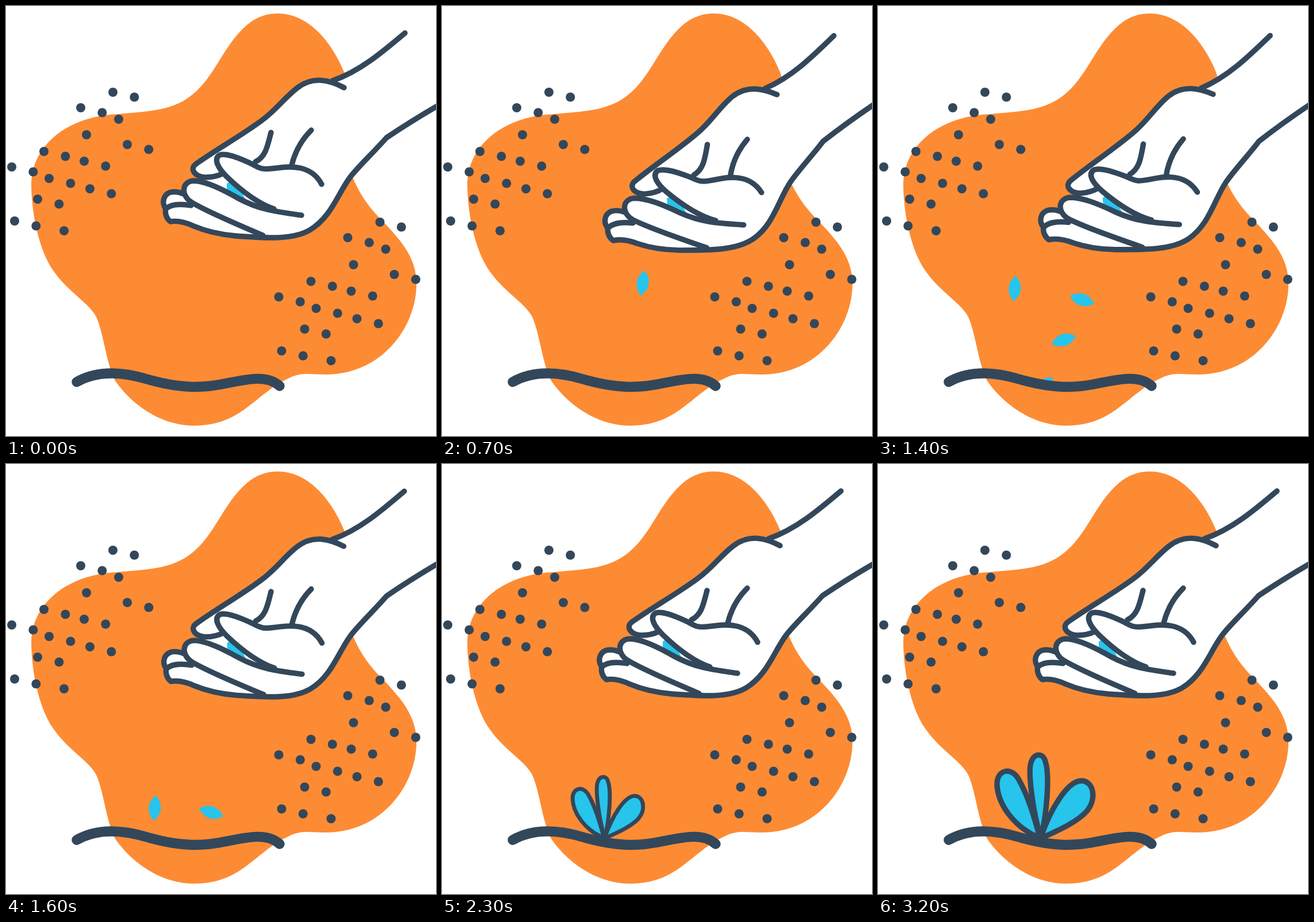
Animation, 748 px wide and 748 px high, one loop 3400 ms. Source, as an HTML page:

```html
<!DOCTYPE html>
<html lang="en">
<head>
<meta charset="utf-8">
<title>Planting hand</title>
<style>
  html, body { margin: 0; width: 100%; height: 100%; overflow: hidden; background: #fff; }
  svg { display: block; width: 100vw; height: 100vh; }
  .line { fill: none; stroke: #33475b; stroke-width: 9.4; stroke-linecap: round; stroke-linejoin: round; }
  .ground { stroke-width: 17.4; }
  .leaf { fill: #27c4ec; }
</style>
</head>
<body>
<svg viewBox="0 0 748 748">
  <defs>
    <clipPath id="air">
      <path d="M0 0H748V661H476C455 642 425 648 385 656C340 666 300 665 245 649C205 637 160 633 123 654H0Z"/>
    </clipPath>
    <path id="petal" d="M0 -22C14 -9 14 9 0 22C-14 9 -14 -9 0 -22Z"/>
    <g id="dots" fill="#33475b"></g>
  </defs>

  <path fill="#fd8b34" d="M473 13C525 13 566 61 588 115C606 165 588 250 603 298C617 331 633 352 656 375C684 405 714 436 714 483C714 560 652 642 555 641C530 641 515 637 495 646C460 662 445 680 413 703C388 721 360 730 328 730C270 730 219 694 190 652C174 620 171 575 158 543C147 518 108 498 82 460C57 424 44 360 44 308C46 240 110 191 195 188C238 184 280 183 312 163C362 132 374 72 419 33C437 18 455 13 473 13Z"/>
  <use href="#dots"/>
  <use href="#dots" x="464.5" y="226"/>

  <g id="hand">
    <path fill="#fff" d="M694 47C655 80 620 110 568 130C545 126 527 126 506 143C483 161 470 181 445 199C410 225 370 247 333 273C316 283 330 298 347 298L328 304C312 304 305 316 309 327C302 324 294 322 286 324C274 328 270 342 278 353C276 360 279 370 286 375C298 373 312 376 327 383C346 391 366 397 400 400C455 404 498 407 528 390C566 368 578 324 600 296C616 276 638 256 662 229C705 200 735 182 780 157Z"/>
    <path class="leaf" d="M384 309Q387 305 393 307Q409 319 416 335Q398 331 384 318Z"/>
    <g class="line">
      <path d="M694 47C655 80 615 114 568 130"/>
      <path d="M588 142C565 130 535 120 506 143C483 161 470 181 445 199C410 225 370 247 333 273C316 283 330 298 347 298C360 298 370 295 378 291"/>
      <path d="M780 157C735 182 705 200 662 229C638 256 616 276 600 296C578 324 566 368 528 390C498 407 455 404 400 400C366 397 346 391 327 383C312 376 298 373 286 375C279 370 276 360 278 353C285 346 300 343 322 347"/>
      <path d="M278 353C270 342 274 328 286 324C294 322 302 324 309 327"/>
      <path d="M514 364C470 358 440 354 405 335C375 318 350 306 328 304C306 304 303 328 322 341C340 352 395 377 447 399"/>
      <path d="M549 310C533 280 503 278 478 281C440 286 445 283 424 273C400 262 383 256 372 259C360 266 369 282 384 297C410 322 440 344 466 353"/>
      <path d="M461 220C455 243 452 262 434 271M531 216C514 233 503 252 497 277"/>
    </g>
  </g>

  <g id="petals" class="leaf" clip-path="url(#air)"></g>

  <g id="plant">
    <path class="line leaf" d="M283 651C235 632 208 590 207 557C207 531 233 525 246 551C262 580 272 615 281 648Z"/>
    <path class="line leaf" d="M283 650C300 600 330 550 355 551C376 553 380 583 364 603C348 622 315 637 283 651Z"/>
    <path class="line leaf" d="M283 650C268 600 260 530 267 517C272 503 287 502 291 517C299 540 294 610 283 650Z"/>
  </g>
  <path class="line ground" d="M123 654C160 633 205 637 245 649C300 665 340 666 385 656C425 648 455 642 476 661"/>
</svg>
<script>
const LOOP = 3400, STEP = 100;
const $ = id => document.getElementById(id);
const add = (parent, tag, attrs) => {
  const el = document.createElementNS('http://www.w3.org/2000/svg', tag);
  for (const k in attrs) el.setAttribute(k, attrs[k]);
  return parent.appendChild(el);
};
const place = (el, shown, transform) => {
  el.setAttribute('visibility', shown ? 'visible' : 'hidden');
  el.setAttribute('transform', transform);
};

// Dots mostly come in pairs along one slanted direction.
const dot = (cx, cy) => add($('dots'), 'circle', { cx, cy, r: 8 });
const pair = (x, y) => { dot(x, y); dot(x + 37.3, y + 8.5); };
pair(186, 150); pair(130, 177); pair(211, 241); pair(66, 253); pair(136, 270);
pair(10, 280); pair(75, 300); pair(146, 318); pair(55, 336); pair(15, 374);
dot(196, 197); dot(140, 224); dot(101, 391);

// Progress from 0 to 1 between two times, plain and eased at both ends.
const ramp = (t, from, to) => Math.min(1, Math.max(0, (t - from) / (to - from)));
const ease = (t, from, to) => (1 - Math.cos(Math.PI * ramp(t, from, to))) / 2;

const tilt = t => ease(t, 360, 610) - ease(t, 1360, 1660);
const growth = t => 1.03 * ease(t, 1800, 2580) - .03 * (1 - (1 - ramp(t, 2580, 3200)) ** 4);

// Position and angle are quadratics [start, speed, bend] per step since birth.
const GRAVITY = 3;
const curve = ([a, b = 0, c = 0], u) => a + b * u + c * u * u;
const swing = born => ({ born, x: [299, -38.9, 6.17], y: [376, 29.5], angle: [219, -114.4, 14.3] });
const petals = [
  { born: 400, x: [377.4, -9.4], y: [386, 23], angle: [14, -2] },
  { born: 900, x: [288, 7], y: [411, 19], angle: [76, -.8] },
  { born: 1100, x: [352, 1], y: [413.5, 23.5], angle: [108] },
  swing(800),
  swing(1100)
];
for (const p of petals) p.el = add($('petals'), 'use', { href: '#petal' });

function draw(t) {
  place($('hand'), true, `rotate(${-4.1 * tilt(t)} 754 222)`);
  for (const { el, born, x, y, angle } of petals) {
    const u = (t - born) / STEP;
    place(el, u >= 0, `translate(${curve(x, u)} ${curve([...y, GRAVITY], u)}) rotate(${curve(angle, u)})`);
  }
  const s = growth(t);
  place($('plant'), s > 0, `translate(283 651) scale(${s}) translate(-283 -651)`);
}

// The motion runs in held steps, with longer holds at both ends.
function held(t) {
  if (t < 400) return 0;
  if (t >= 3200) return 3200;
  return Math.min(3000, Math.floor(t / STEP) * STEP);
}

const start = performance.now();
function tick() {
  draw(held((performance.now() - start) % LOOP));
  requestAnimationFrame(tick);
}
tick();
</script>
</body>
</html>
```
